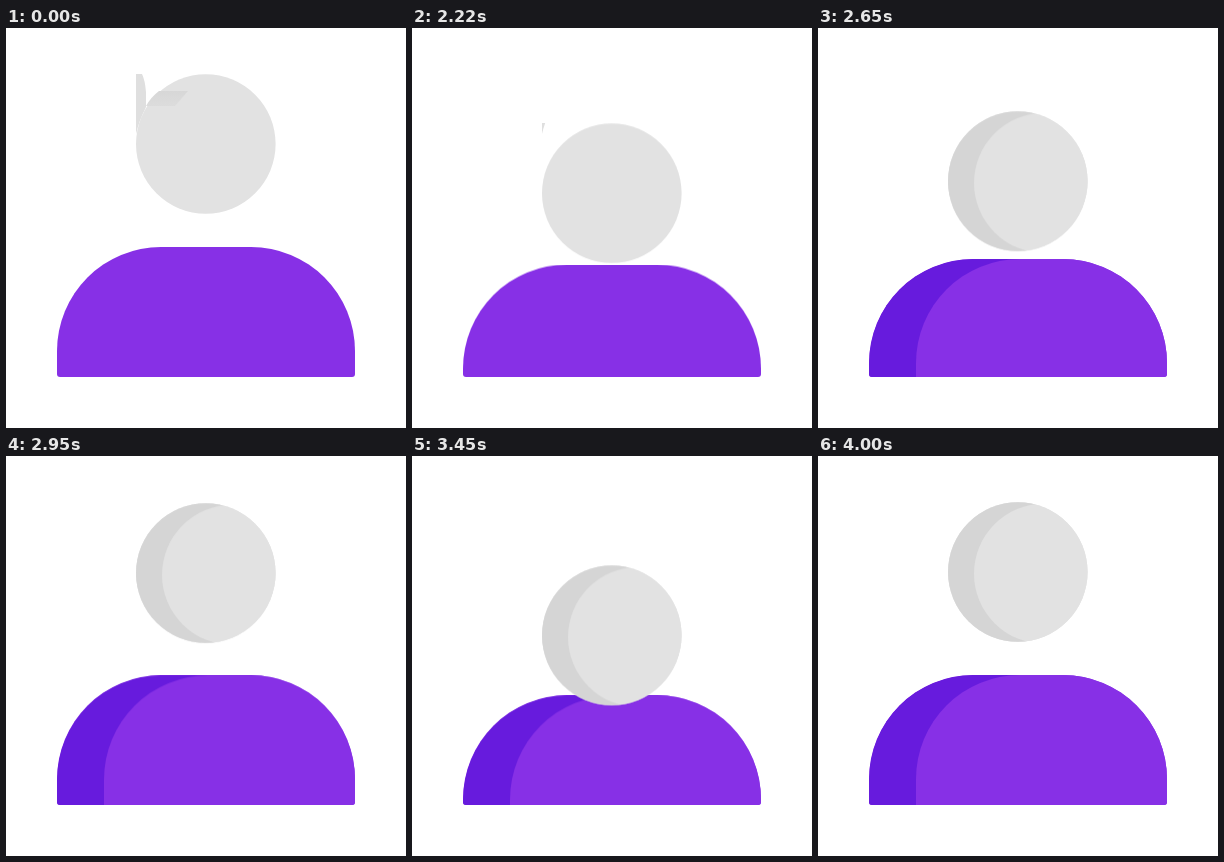
An HTML page that plays this animation: 400x400 px, repeating every 4.02 s.

```html
<!DOCTYPE html>
<html lang="en">
<head>
<meta charset="utf-8">
<title>Bouncing avatar</title>
<style>
  html, body { margin: 0; width: 100%; height: 100%; overflow: hidden; background: #fff; }
  svg { display: block; width: 100vw; height: 100vh; }

  .head, .body, .late, .early { animation: 4020ms linear infinite; }
  .head { animation-name: head; }
  .body { animation-name: body; }
  .late { animation-name: appear; }
  .early { animation-name: vanish; }

  /* rest for 2 s, then two bounces: 340 ms down, 660 ms up */
  @keyframes head {
    0%, 100% { transform: translateY(0); }
    49.75%, 74.63% { transform: translateY(0); animation-timing-function: cubic-bezier(.333, 0, .667, 1); }
    58.21%, 83.08% { transform: translateY(68.5px); animation-timing-function: cubic-bezier(.333, 0, .667, 1); }
    99.5% { transform: translateY(0); }
  }
  @keyframes body {
    0%, 100% { transform: translateY(0); }
    49.75%, 74.63% { transform: translateY(0); animation-timing-function: cubic-bezier(.167, .167, .667, 1); }
    58.21%, 83.08% { transform: translateY(22px); animation-timing-function: cubic-bezier(.333, 0, .667, 1); }
    99.5% { transform: translateY(0); }
  }
  @keyframes appear {
    0%, 58.2% { opacity: 0; }
    58.21%, 100% { opacity: 1; }
  }
  @keyframes vanish {
    0%, 58.2% { opacity: 1; }
    58.21%, 100% { opacity: 0; }
  }
</style>
</head>
<body>
<svg viewBox="0 0 400 400">
  <defs>
    <clipPath id="floor"><rect x="51" y="100" width="298" height="249" rx="3"/></clipPath>
    <clipPath id="disc"><circle cx="199.8" cy="116" r="69.8"/></clipPath>
    <clipPath id="box"><rect class="head" x="130" y="46" width="140" height="140"/></clipPath>
    <path id="torso" d="M51 400V323A104 104 0 0 1 155 219H245A104 104 0 0 1 349 323V400Z"/>
    <clipPath id="torsoClip"><use href="#torso"/></clipPath>
    <linearGradient id="sheen" x2="0" y2="1">
      <stop offset="0" stop-color="#d7d7d7"/>
      <stop offset="1" stop-color="#dcdcdc"/>
    </linearGradient>
  </defs>

  <g clip-path="url(#floor)">
    <g class="body">
      <use href="#torso" fill="#8730e6"/>
      <g class="late" clip-path="url(#torsoClip)">
        <use href="#torso" fill="#671bdd"/>
        <use href="#torso" x="47" fill="#8730e6"/>
      </g>
    </g>
  </g>

  <g class="early" clip-path="url(#box)">
    <path fill="#dfdfdf" d="M130 46H136Q139 52 140 64V79Q133 93 130 106Z"/>
  </g>

  <g class="head">
    <circle cx="199.8" cy="116" r="69.8" fill="#e2e2e2"/>
    <g class="late" clip-path="url(#disc)">
      <circle cx="199.8" cy="116" r="71" fill="#d5d5d5"/>
      <circle cx="226" cy="117.7" r="70" fill="#e2e2e2"/>
    </g>
  </g>

  <g class="early" clip-path="url(#box)">
    <path fill="url(#sheen)" d="M153 63H182L169 78H140Q145 69 153 63Z"/>
  </g>
</svg>
</body>
</html>
```
